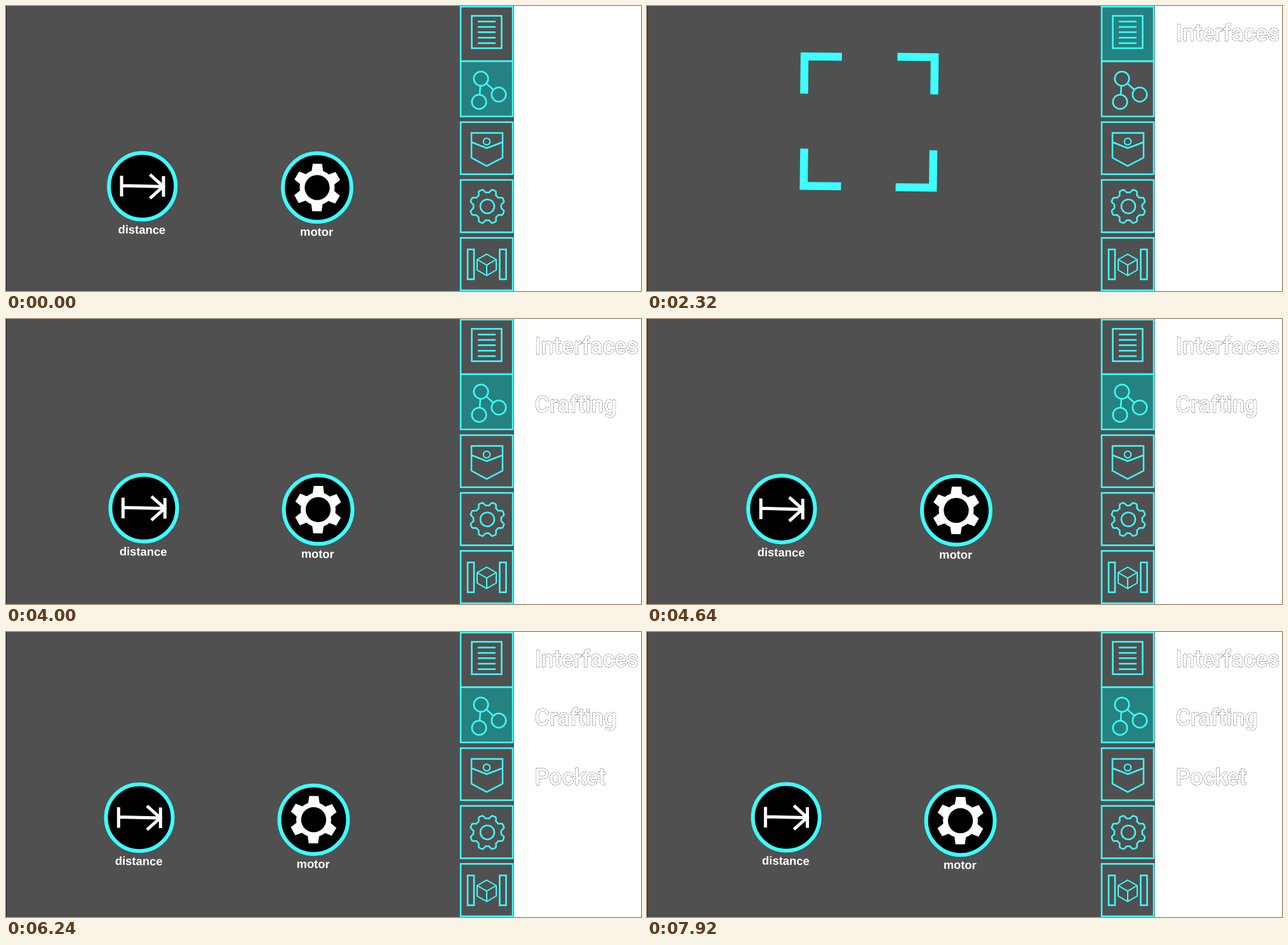
These frames come from a looping animation (1000 by 449 pixels, 8000 ms). An HTML page:

```html
<!DOCTYPE html>
<html lang="en">
<head>
<meta charset="utf-8">
<title>Menu tour</title>
<style>
  html, body { margin: 0; width: 100%; height: 100%; overflow: hidden; background: #fff; }
  svg { display: block; width: 100vw; height: 100vh; }
  .menu { fill: none; stroke: #3cffff; stroke-width: 2.5; }
  .caption { font: 500 36px Roboto, sans-serif; fill: #fff; stroke: #3a3a3a; stroke-width: .9;
    stroke-dasharray: 3 1; paint-order: stroke; }
  .label { font: bold 18.4px "Liberation Sans", Arial, sans-serif; fill: #fff; text-anchor: middle; }
  .ring { fill: #000; stroke: #3cffff; stroke-width: 6; }
</style>
</head>
<body>
<svg viewBox="0 0 1000 449" preserveAspectRatio="none">
  <rect width="800" height="449" fill="#505050"/>
  <rect width="1" height="449" fill="#222"/>

  <g id="brackets" fill="#3cffff"></g>

  <g id="nodes">
    <g id="distance">
      <circle class="ring" r="52.6"/>
      <path d="M-32.7-16.5V16M-33-1L33 .6M12-18.5L33 .3 12 19M33.3-16V16.5" fill="none" stroke="#fff" stroke-width="5"/>
      <text class="label" y="74.7" transform="rotate(.7)">distance</text>
    </g>
    <g id="motor">
      <circle class="ring" r="54"/>
      <g id="cog" fill="#fff"><circle r="27.5"/></g>
      <circle r="19.7"/>
      <text class="label" y="76" transform="rotate(.7)">motor</text>
    </g>
  </g>

  <g class="menu">
    <g id="boxes"></g>
    <path d="M733.5 15.5H780.5V66.5H733.5ZM743 24.5H771M743 33H771M743 41.3H771M743 50H771M743 58.5H771"/>
    <circle cx="748" cy="114.5" r="11.3"/>
    <circle cx="776" cy="139.5" r="11.3"/>
    <circle cx="745" cy="151" r="11.3"/>
    <path d="M747 126L746 139.5M756.5 122L767.5 132"/>
    <path d="M733 200H782V239L757 252 733 239ZM733 214.5L757 224 782 214.5"/>
    <circle cx="757" cy="213.5" r="5.3" stroke-width="2"/>
    <path id="gear" stroke-linejoin="round"/>
    <circle cx="758" cy="315.7" r="11"/>
    <path d="M727 383.5H737V430.5H727ZM777.500 383.5H787.500V430.5H777.500Z"/>
    <path d="M757 391L772 399.500V416L757 424.500 742 416V399.500ZM742 399.500L757 408 772 399.500M757 408V424.500" stroke-width="2"/>
  </g>

  <text class="caption" x="832.500" y="54.500">Interfaces</text>
  <text class="caption" x="832.500" y="147">Crafting</text>
  <text class="caption" x="832.500" y="241">Pocket</text>
</svg>
<script>
const LOOP = 8000, STEP = 80;
const CAPTION_TIMES = [480, 3040, 5840];
const byId = id => document.getElementById(id);
const captions = [...document.querySelectorAll('.caption')];

function add(parent, tag, attrs) {
  const el = document.createElementNS('http://www.w3.org/2000/svg', tag);
  for (const [name, value] of Object.entries(attrs)) el.setAttribute(name, value);
  return byId(parent).appendChild(el);
}

const boxes = [[1, 86], [87, 87], [183, 82], [274, 82.5], [365.3, 82.5]].map(([y, height]) =>
  add('boxes', 'rect', { x: 716, y, width: 82, height }));

[[239, 73], [456.5, 74.5], [453.5, 292.5], [237.5, 289.5]].forEach(([x, y], i) =>
  add('brackets', 'path', {
    d: 'M0 0H65V12.5H12.5V65H0Z',
    transform: `translate(${x} ${y}) rotate(${i * 90 + 0.7})`
  }));

for (let i = 0; i < 6; i++)
  add('cog', 'path', { d: 'M-9.5-23L-7.300-37.300H7.300L9.500-23Z', transform: `rotate(${i * 60 + 0.7})` });

// Eight soft teeth: a clipped cosine around the hub.
let outline = '';
for (let i = 0; i < 160; i++) {
  const a = i / 160 * Math.PI * 2;
  const tooth = Math.max(-1, Math.min(1, -1.7 * Math.cos(8 * a)));
  const r = 24.6 + 2.7 * tooth;
  outline += `${i ? 'L' : 'M'}${(758 + r * Math.cos(a)).toFixed(2)} ${(315.7 + r * Math.sin(a)).toFixed(2)}`;
}
byId('gear').setAttribute('d', outline + 'Z');

// Handheld drift: time, x, y, motor x offset, motor y offset.
const nodeKeys = [
  [0, 214.7, 284, 275.3, 2],
  [480, 215.5, 284.5, 275.3, 2],
  [3040, 213.5, 295, 274.5, 2.5],
  [3280, 214.7, 296, 274.4, 2.6],
  [4000, 217, 298, 274.6, 2.3],
  [4640, 212, 299.3, 275, 2.2],
  [5360, 208.5, 294, 274.7, 2.8],
  [5600, 216, 291.3, 274.5, 3.3],
  [6240, 210, 292.5, 274.5, 3.2],
  [6880, 218.6, 293.3, 274.5, 3.5],
  [7400, 208, 293, 274.5, 4],
  [7920, 219.3, 292, 274.3, 5.2]
];
const bracketKeys = [[480, 1, 0], [1120, 0, 0], [1500, -3, 0], [1840, 0.5, 0], [2240, 3, 0], [3040, 2, 0]];

function sample(keys, t) {
  const next = keys.findIndex(key => key[0] > t);
  if (next < 0) return keys[keys.length - 1].slice(1);
  if (next === 0) return keys[0].slice(1);
  const a = keys[next - 1], b = keys[next];
  const u = (t - a[0]) / (b[0] - a[0]);
  const eased = u * u * (3 - 2 * u);
  return a.slice(1).map((value, i) => value + (b[i + 1] - value) * eased);
}

const move = (id, x, y) => byId(id).setAttribute('transform', `translate(${x.toFixed(2)} ${y.toFixed(2)})`);
const show = (el, on) => el.setAttribute('visibility', on ? 'visible' : 'hidden');

function render(time) {
  const t = Math.floor((time % LOOP) / STEP) * STEP;
  const scanning = t >= CAPTION_TIMES[0] && t < CAPTION_TIMES[1];
  captions.forEach((el, i) => show(el, t >= CAPTION_TIMES[i]));
  boxes.forEach((el, i) => el.setAttribute('fill', i === (scanning ? 0 : 1) ? '#268280' : 'none'));
  show(byId('brackets'), scanning);
  show(byId('nodes'), !scanning);

  const [x, y, dx, dy] = sample(nodeKeys, t);
  move('distance', x, y);
  move('motor', x + dx, y + dy);
  move('brackets', ...sample(bracketKeys, t));
}

const start = performance.now();
function tick() {
  render(performance.now() - start);
  requestAnimationFrame(tick);
}
tick();
</script>
</body>
</html>
```
